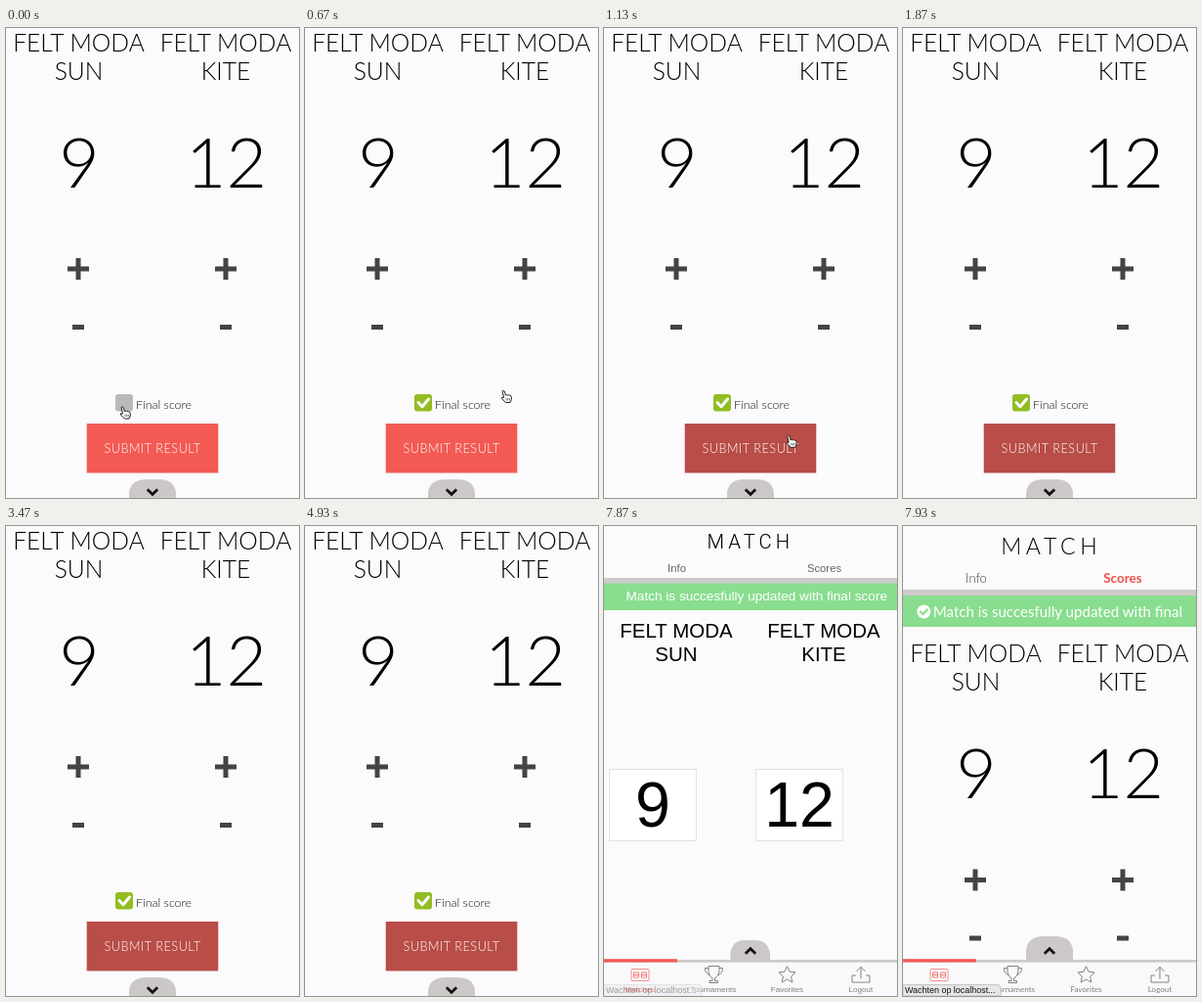
An HTML page that plays this animation: 300 by 480 pixels, repeating every 8000 ms.

```html
<!DOCTYPE html>
<html lang="en">
<head>
<meta charset="utf-8">
<title>Match score</title>
<style>
  html, body { margin: 0; width: 100%; height: 100%; overflow: hidden; background: #fbfafc; }
  svg { display: block; width: 100%; height: 100%; }
  text { text-anchor: middle; }
  .lato { font-family: Lato, sans-serif; font-weight: 300; }
  .sans { font-family: "Liberation Sans", Arial, sans-serif; }
  .thin { font-family: Roboto, "Liberation Sans", sans-serif; font-weight: 300; }
  .regular { font-weight: 400; }
  .heavy { font-weight: 700; }
  .left { text-anchor: start; }
  .team { font-size: 24.6px; }
  .points { font-size: 71.5px; }
  .line { fill: none; stroke: #777; stroke-width: .9; stroke-linejoin: round; }
  .tick { fill: none; stroke-linecap: round; stroke-linejoin: round; }
  .chevron { fill: none; stroke: #111; stroke-width: 2.8; }
</style>
</head>
<body>
<svg viewBox="0 0 300 480">
  <rect width="300" height="480" fill="#fbfafc"/>

  <!-- score editor -->
  <g id="score" class="lato" fill="#000">
    <text class="team" x="74.5" y="23.6">FELT MODA</text>
    <text class="team" x="74.5" y="52.6">SUN</text>
    <text class="team" x="225" y="23.6">FELT MODA</text>
    <text class="team" x="225" y="52.6">KITE</text>
    <text class="points" x="75" y="162.8">9</text>
    <text class="points" x="225.5" y="162.8">12</text>
    <path fill="#444" d="M63 243.5h22v5h-22zM71.5 235h5v22h-5zM68 303h12v5h-12z
      M214 243.5h22v5h-22zM222.5 235h5v22h-5zM219 303h12v5h-12z"/>
  </g>

  <!-- final score form -->
  <g id="form">
    <rect id="box" x="112" y="374" width="18" height="17.5" rx="3"/>
    <path id="mark" class="tick" stroke="#fff" stroke-width="3" d="M116 382.5l4 4.2l6.5-7.7"/>
    <text class="lato left" x="133" y="388.8" font-size="12.4" fill="#111">Final score</text>
    <rect id="button" x="82.7" y="404" width="134.6" height="50.4"/>
    <text class="lato" x="150.2" y="434.3" font-size="12.7" letter-spacing=".5" fill="#fff">SUBMIT RESULT</text>
    <path fill="#cdc8c8" d="M126 480v-6q2-13 18-13h12q16 0 18 13v6z"/>
    <path class="chevron" d="M144.8 471.3l5.2 5l5.2-5"/>
    <g id="cursor">
      <path fill="#fff" stroke="#222" stroke-width="1" stroke-linejoin="round"
        d="M1 1.5Q2 0 3.2 1.5L4.3 5.5Q6 4.5 6.6 5.6Q8.2 4.8 8.8 6Q10.2 5.8 10.3 7.3V10L9 13H4.5L.5 9Q-.5 7 2.5 8z"/>
      <path stroke="#444" stroke-width=".7" d="M5 8.5v2.5M6.7 8.5v2.5M8.3 8.5v2.5"/>
    </g>
  </g>

  <!-- saved, web font not yet applied -->
  <g id="plain" class="sans">
    <text class="thin" x="149.8" y="22.5" font-size="20.3" letter-spacing="4">MATCH</text>
    <g font-size="11.3" fill="#666">
      <text x="74.5" y="46.5">Info</text>
      <text x="225.5" y="46.5">Scores</text>
    </g>
    <rect y="53" width="300" height="6" fill="#cfcaca"/>
    <rect y="58.5" width="300" height="27.5" fill="#89dd8f"/>
    <text class="left" x="22.5" y="76.4" font-size="13.6" fill="#fff">Match is succesfully updated with final score</text>
    <g font-size="20.5">
      <text x="74" y="113.8">FELT MODA</text>
      <text x="74" y="137.6">SUN</text>
      <text x="225" y="113.8">FELT MODA</text>
      <text x="225" y="137.6">KITE</text>
    </g>
    <g fill="#fff" stroke="#e2e1e3">
      <rect x="5.5" y="248.5" width="89" height="73"/>
      <rect x="155.5" y="248.5" width="89" height="73"/>
    </g>
    <g font-size="64.5">
      <text x="50" y="307.3">9</text>
      <text x="200" y="307.3">12</text>
    </g>
    <path fill="#cdc8c8" d="M129.5 444v-8q2-13 15-13h10q13 0 15.5 13v8z"/>
  </g>

  <!-- saved, fully styled -->
  <g id="styled" class="lato">
    <text x="151.8" y="29.3" font-size="23.2" letter-spacing="4.6">MATCH</text>
    <text x="75" y="58" font-size="13" fill="#444">Info</text>
    <text class="heavy" x="225" y="58" font-size="13.5" fill="#ef4f4a">Scores</text>
    <rect y="65" width="300" height="6" fill="#cfcaca"/>
    <rect y="71" width="300" height="32" fill="#89dd8f"/>
    <circle cx="21.3" cy="87.5" r="7" fill="#fff"/>
    <path class="tick" stroke="#89dd8f" stroke-width="2.2" d="M18 87.5l2.5 2.7l4.3-4.7"/>
    <text class="regular left" x="30.8" y="93" font-size="15.1" fill="#fff">Match is succesfully updated with final</text>
    <path fill="#cdc8c8" d="M126 444v-11q2-14 18-14h12q16 0 18 14v11z"/>
  </g>

  <!-- navigation -->
  <g id="nav">
    <path class="chevron" d="M144.8 436.7l5.2-5l5.2 5"/>
    <rect y="443" width="300" height="37" fill="#f9f8fa"/>
    <rect y="443" width="300" height="2.7" fill="#cfcaca"/>
    <rect y="442.2" width="75" height="3.3" fill="#f25a54"/>
    <g fill="none" stroke="#f25a54" opacity=".8">
      <rect x="28" y="452.5" width="18" height="12" rx="1" stroke-width=".8"/>
      <path d="M30.5 456h5v5h-5zM38.5 456h5v5h-5zM30.5 458.5h5M38.5 458.5h5"/>
    </g>
    <path class="line" d="M107 449.5h11v5q-1 6-4.5 7v3h3v2h-8.5v-2h3v-3q-3.5-1-4-7z
      M107 451.5h-3.5q0 6 5 7M118 451.5h3.5q0 6-5 7"/>
    <path id="star" class="line"/>
    <path class="line" d="M258 459h-4v7h18v-7h-4M263 462.5v-12M258.5 455l4.5-4.7l4.5 4.7"/>
    <g id="labels" font-size="8.1" fill="#808080">
      <text x="36.8" y="476" fill="#f25a54">Matches</text>
      <text x="112" y="476">Tournaments</text>
      <text x="187.5" y="476">Favorites</text>
      <text x="263" y="476">Logout</text>
    </g>
    <g id="status">
      <path fill="#e6e5e7" stroke="#bbb" stroke-width=".8" d="M0 468.5h97q3 0 3 3v8.5h-100z"/>
      <text class="sans left" x="2" y="477.3" font-size="8.95" fill="#111">Wachten op localhost...</text>
    </g>
  </g>
</svg>
<script>
const $ = id => document.getElementById(id);
const LOOP = 8000, CHECK = 140, HOVER = 868, LEAVE = 1560, PLAIN = 7870, STYLED = 7930;

// time, x, y of the pointer
const path = [
  [0, 117, 386], [200, 117, 386], [370, 144, 370], [560, 190, 360],
  [700, 204, 372], [870, 195, 399], [930, 194.5, 408], [1150, 186, 416], [1400, 180, 419]
];

const show = (id, on) => { $(id).style.display = on ? '' : 'none'; };
const clamp = v => Math.max(0, Math.min(1, v));
const mix = (a, b, k) => a + (b - a) * k;
const ease = k => k * k * (3 - 2 * k);

function pointer(t) {
  const i = path.findIndex(p => p[0] > t);
  if (i < 0) return path[path.length - 1].slice(1);
  const a = path[i - 1], b = path[i], k = (t - a[0]) / (b[0] - a[0]);
  return [mix(a[1], b[1], k), mix(a[2], b[2], k)];
}

function buttonColor(t) {
  const k = ease(clamp((t - HOVER) / 190));
  const from = [243, 90, 84], to = [185, 77, 71];
  return `rgb(${from.map((c, i) => Math.round(mix(c, to[i], k)))})`;
}

function starPath(cx, cy, r) {
  let d = '';
  for (let i = 0; i < 10; i++) {
    const a = i * Math.PI / 5, s = i % 2 ? r * .48 : r;
    d += `${i ? 'L' : 'M'}${cx + s * Math.sin(a)} ${cy - s * Math.cos(a)}`;
  }
  return d + 'z';
}

function draw(t) {
  const form = t < PLAIN, styled = t >= STYLED, plain = !form && !styled;
  show('form', form);
  show('score', !plain);
  show('plain', plain);
  show('styled', styled);
  show('nav', !form);
  $('score').setAttribute('transform', `translate(0 ${styled ? 115.5 : 0})`);
  $('labels').setAttribute('class', styled ? 'lato regular' : 'sans');
  $('status').setAttribute('opacity', styled ? 1 : .4);

  const checked = t >= CHECK;
  $('box').setAttribute('fill', checked ? '#92bd22' : '#b9b8ba');
  show('mark', checked);
  $('button').setAttribute('fill', buttonColor(t));
  show('cursor', t < LEAVE);
  $('cursor').setAttribute('transform', `translate(${pointer(t)})`);
}

$('star').setAttribute('d', starPath(187.5, 458.7, 9));
const start = performance.now();
function tick() {
  draw((performance.now() - start) % LOOP);
  requestAnimationFrame(tick);
}
draw(0);
requestAnimationFrame(tick);
</script>
</body>
</html>
```
